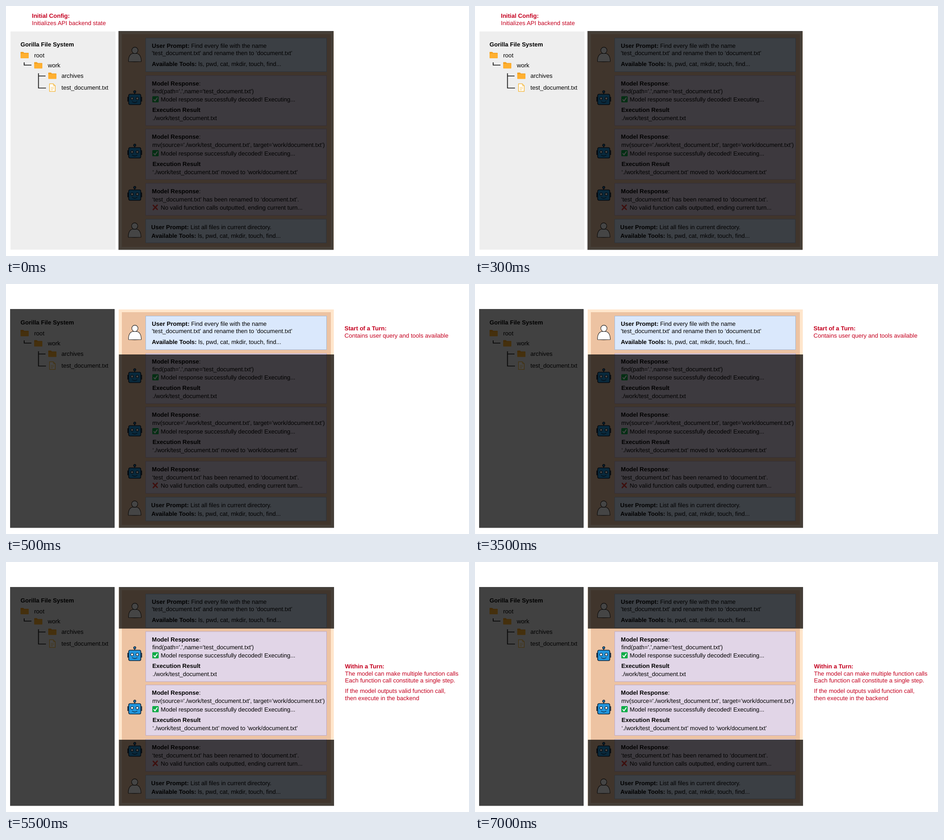
Recreate the animation shown at these times as an HTML page. Size 1019 px wide and 550 px high, loop 8 s.

```html
<!DOCTYPE html>
<html lang="en">
<head>
<meta charset="utf-8">
<title>Turns and steps</title>
<style>
html, body { margin: 0; width: 100%; height: 100%; overflow: hidden; background: #fff; }
svg { display: block; width: 100%; height: 100%; }
text {
  font: 13.07px "Liberation Sans", Arial, sans-serif;
  white-space: pre;
  text-rendering: geometricPrecision;
}
.b { font-weight: bold; }
.note { fill: #c4001f; }
.shade { fill: #000; fill-opacity: .73; }
.side { fill: #eee; }
.outer { fill: #ffe6cc; }
.inner { fill: #edc3a2; }
.user { fill: #dae8fc; stroke: #a3b9d8; }
.model { fill: #e1d5e7; stroke: #bda9c8; }
.person { fill: #fff; stroke: #222; stroke-width: 1.1; stroke-linejoin: round; }
.bot { fill: #2196de; stroke: #14283c; stroke-width: 1.7; stroke-linejoin: round; }
.eye { fill: #fff; stroke: #14283c; stroke-width: 1.3; }
.smile { fill: none; stroke: #14283c; stroke-width: 1.4; stroke-linecap: round; }
.folder { fill: #ffb031; }
.tab { fill: #f2a01f; }
.page { fill: #fff; stroke: #f5b32e; stroke-width: 1.3; stroke-linejoin: round; }
.rule { fill: none; stroke: #f5b32e; stroke-width: .8; }
.tree { fill: none; stroke: #111; stroke-width: 1.7; }
.ok { fill: #0cab46; }
.tick { fill: none; stroke: #fff; stroke-width: 2; }
.bad { fill: none; stroke: #e23a36; stroke-width: 2.8; stroke-linecap: round; }
</style>
</head>
<body>
<svg id="stage" viewBox="0 0 1019 550" preserveAspectRatio="none"></svg>
<script>
const LOOP = 8000;

const rect = (cls, x, y, x2, y2) =>
  `<rect class="${cls}" x="${x}" y="${y}" width="${x2 - x}" height="${y2 - y}"/>`;
const path = (cls, d) => `<path class="${cls}" d="${d}"/>`;
const at = (x, y, body) => `<g transform="translate(${x} ${y})">${body}</g>`;

// Text between asterisks is bold.
const text = (x, y, s, cls = '') =>
  `<text class="${cls}" x="${x}" y="${y}">${s.replace(/\*(.+?)\*/g, '<tspan class="b">$1</tspan>')}</text>`;
const lines = (rows, cls) => rows.map(r => text(...r, cls)).join('');

const folder = (x, y) => at(x, y,
  path('tab', 'M0 1Q0 0 1 0H6L8 2H17Q18 2 18 3V8H0Z') +
  path('folder', 'M0 3.5H17Q18 3.5 18 4.5V13Q18 14 17 14H1Q0 14 0 13Z'));

const page = (x, y) => at(x, y,
  path('page', 'M.7 .7H9L13.3 5V17.3H.7Z') +
  path('rule', 'M9 1V5H13M3.5 8.5H10.5M3.5 11.3H10.5M3.5 14H8'));

const person = (x, y) => at(x, y,
  path('person', 'M.7 32.3C0 22 4 15.5 10 14.5H19C25 15.5 29 22 28.6 32.3Q14 33 .7 32.3Z') +
  '<ellipse class="person" cx="14.7" cy="7.6" rx="6.8" ry="7"/>');

const robot = y => at(267, y,
  path('bot', 'M16.3 5V9') +
  '<circle class="bot" cx="16.3" cy="3.2" r="2.3"/>' +
  path('bot', 'M3 15H1V24H3ZM29.6 15H31.6V24H29.6Z') +
  '<rect class="bot" x="3" y="8.5" width="26.6" height="23" rx="3"/>' +
  '<circle class="eye" cx="10.5" cy="18" r="2.9"/><circle class="eye" cx="22" cy="18" r="2.9"/>' +
  path('smile', 'M11 25Q16.3 29 21.6 25'));

const check = y => at(322, y,
  '<rect class="ok" width="14" height="13.5" rx="1.5"/>' + path('tick', 'M3 7L6 10.3L11.3 2.8'));

const cross = y => at(322, y, path('bad', 'M2 2L11 11M11 1.5L2 11.5'));

const tools = '*Available Tools:* ls, pwd, cat, mkdir, touch, find...';
const decoded = 'Model response successfully decoded! Executing...';

const scene =
  rect('side', 10, 56, 241, 536) +
  text(32, 89, '*Gorilla File System*') +
  folder(32, 101) + folder(62, 123.5) + folder(93, 146.5) + page(95, 170.5) +
  path('tree', 'M40 124V130H56M71.5 148V180.5H88M71.5 154H87') +
  lines([
    [62, 113, 'root'],
    [92, 134.5, 'work'],
    [122, 158, 'archives'],
    [122, 183.5, 'test_document.txt']
  ]) +
  rect('outer', 248, 56, 721.5, 536) +
  rect('inner', 255, 62, 715, 530) +
  rect('user', 307.5, 70.5, 705.5, 144.5) +
  rect('model', 307.5, 153, 705.5, 263) +
  rect('model', 307.5, 270.5, 705.5, 381.5) +
  rect('model', 307.5, 390, 705.5, 460.5) +
  rect('user', 307.5, 469, 705, 521) +
  person(269, 90) + person(268.5, 476.5) +
  robot(185.5) + robot(303) + robot(396) +
  check(198.5) + check(317) + cross(436.5) +
  lines([
    [321, 92, '*User Prompt:* Find every file with the name'],
    [321, 107.5, "'test_document.txt' and rename then to ‘document.txt’"],
    [321, 131.5, tools],
    [321, 174.5, '*Model Response*:'],
    [322, 192, "find(path='.',name='test_document.txt')"],
    [340.5, 210, decoded],
    [322, 233, '*Execution Result*'],
    [322.5, 251, './work/test_document.txt'],
    [321, 292, '*Model Response*:'],
    [322, 309.5, "mv(source='./work/test_document.txt', target=’work/document.txt’)"],
    [340.5, 328.5, decoded],
    [322.5, 351.5, '*Execution Result*'],
    [322.5, 369.5, '‘./work/test_document.txt’ moved to ’work/document.txt’'],
    [321, 411.5, '*Model Response*:'],
    [321.5, 429.5, '‘test_document.txt’ has been renamed to ‘document.txt’.'],
    [340.5, 447.5, 'No valid function calls outputted, ending current turn...'],
    [319.5, 490.5, '*User Prompt:* List all files in current directory.'],
    [320, 510, tools]
  ]);

const sideShade = [9, 55, 239, 536.5];

// Each step: start time, shaded boxes, red notes.
const steps = [
  { from: 0,
    shade: [[247.5, 55, 721, 536.5]],
    notes: [
      [57, 25.5, '*Initial Config:*'],
      [57, 41.5, 'Initializes API backend state']
    ] },
  { from: 500,
    shade: [sideShade, [248.5, 155, 722, 536.5]],
    notes: [
      [745, 102, '*Start of a Turn:*'],
      [745, 117.5, 'Contains user query and tools available']
    ] },
  { from: 5500,
    shade: [sideShade, [248.5, 55, 722, 146.5], [248.5, 391, 722, 536.5]],
    notes: [
      [746, 233.5, '*Within a Turn:*'],
      [746, 249.5, 'The model can make multiple function calls'],
      [746, 265, 'Each function call constitute a single step.'],
      [746, 288, 'If the model outputs valid function call,'],
      [746, 303.5, 'then execute in the backend']
    ] }
];

const stage = document.getElementById('stage');
stage.innerHTML = scene + steps.map(s =>
  `<g class="step">${s.shade.map(b => rect('shade', ...b)).join('')}${lines(s.notes, 'note')}</g>`
).join('');

// Every step holds its opacity until the next one starts.
stage.querySelectorAll('.step').forEach((el, i) => {
  const frames = steps.map((s, j) => ({
    opacity: i === j ? 1 : 0,
    offset: s.from / LOOP,
    easing: 'steps(1, end)'
  }));
  frames.push({ ...frames[frames.length - 1], offset: 1 });
  el.animate(frames, { duration: LOOP, iterations: Infinity });
});
</script>
</body>
</html>
```
